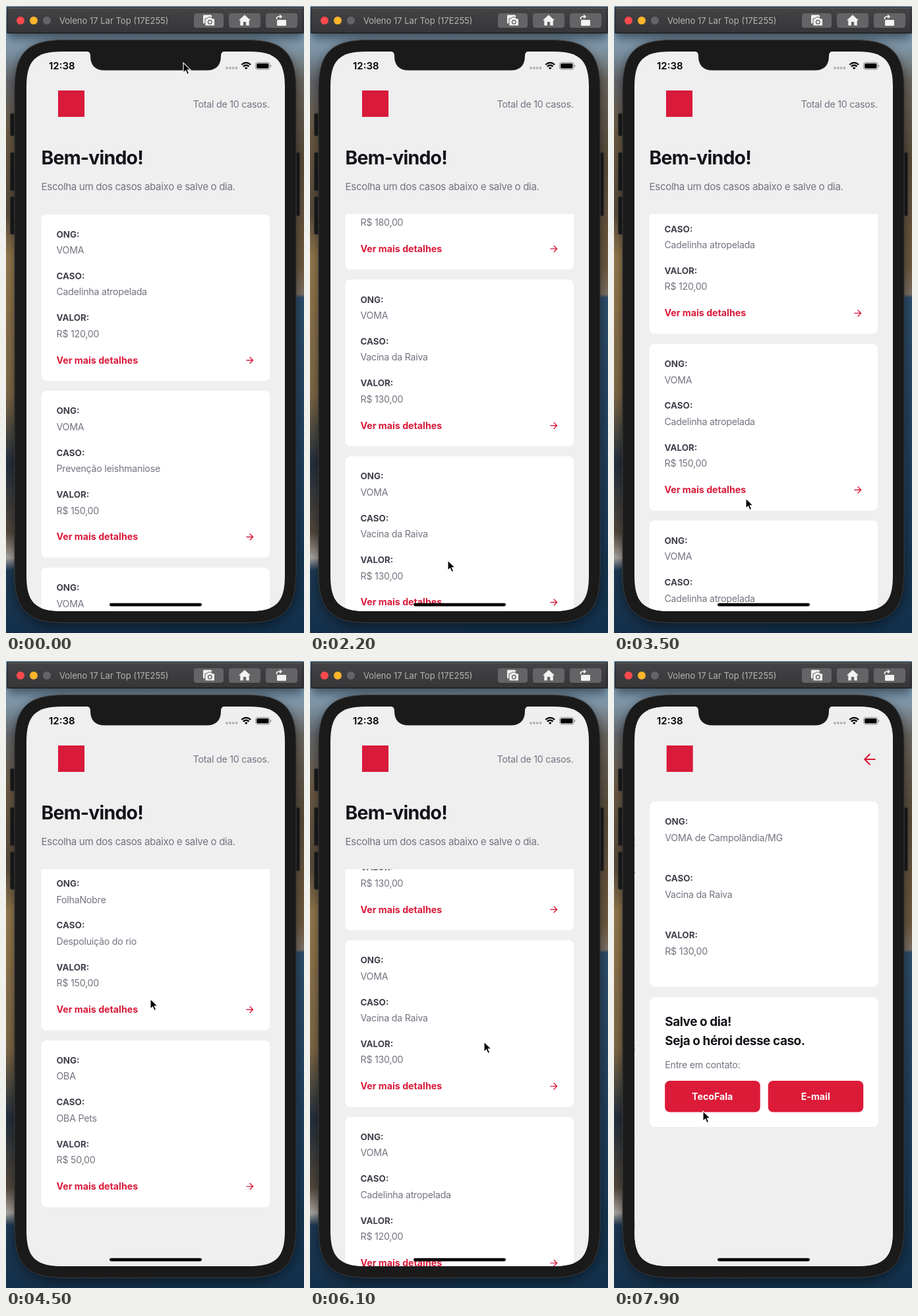
Write an HTML page that moves like this. It is 452x950 px and loops after 8 s.

```html
<!DOCTYPE html>
<html lang="pt-BR">
<head>
<meta charset="utf-8">
<title>Casos</title>
<style>
html, body { margin: 0; width: 100%; height: 100%; overflow: hidden; }
body {
  background:
    linear-gradient(#86a5bd 5%, #63666a 12%, #6b5a44 20%, #57493a 33%, #94794f 40%, #7f6846 62%,
      #23303e 73%, #54483c 84%, #a8a49e 88%, #1e3a55 90%, #142f49) 0 0 / 226px 950px no-repeat,
    linear-gradient(#86a5bd 5%, #6a655f 12%, #574936 25%, #6f5b41 42%, #7d7266 46%,
      #2d4e6c 46.5%, #234462 65%, #12304a) 226px 0 / 226px 950px no-repeat;
}
svg { display: block; width: 452px; height: 950px; }
text { font-family: Inter, "Liberation Sans", sans-serif; -webkit-font-smoothing: antialiased; }
.label { font-size: 13.4px; font-weight: 700; fill: #41414d; }
.value { font-size: 14.2px; fill: #737380; letter-spacing: -.017em; }
.link { font-size: 14.2px; font-weight: 700; fill: #d91a3a; }
.button { font-size: 14.2px; font-weight: 700; fill: #fff; text-anchor: middle; }
.title { font-size: 28.4px; font-weight: 700; fill: #13131a; letter-spacing: -.027em; }
.intro { font-size: 15.1px; fill: #737380; letter-spacing: -.022em; }
.hero { font-size: 18.9px; font-weight: 700; fill: #13131a; letter-spacing: -.022em; }
.clock { font-size: 15px; font-weight: 600; }
.window { font-size: 13px; fill: #b4b4b4; }
.arrow { fill: none; stroke: #d91a3a; stroke-linecap: round; stroke-linejoin: round; }
</style>
</head>
<body>
<svg viewBox="0 0 452 950">
  <defs>
    <clipPath id="screen"><path id="glass"/></clipPath>
    <clipPath id="listArea"><rect x="31" y="315.5" width="392" height="602"/></clipPath>
    <linearGradient id="bar" x2="0" y2="1"><stop stop-color="#444446"/><stop offset="1" stop-color="#363638"/></linearGradient>
    <filter id="soft" x="-10%" y="-50%" width="120%" height="200%"><feGaussianBlur stdDeviation="8"/></filter>
  </defs>

  <!-- phone body -->
  <rect x="2" y="12" width="449" height="38" opacity=".5" filter="url(#soft)"/>
  <rect x="12" y="54" width="429" height="886" rx="62" opacity=".45" filter="url(#soft)"/>
  <g fill="#161616" stroke="#303030">
    <rect x="6.5" y="163" width="9" height="34" rx="2"/>
    <rect x="6.5" y="222" width="9" height="58" rx="2"/>
    <rect x="6.5" y="289" width="9" height="57" rx="2"/>
    <rect x="437" y="222" width="8.5" height="96" rx="2"/>
  </g>
  <path id="body" fill="#1a1a1a" stroke="#3c3c3c"/>

  <g clip-path="url(#screen)">
    <rect x="31" y="69" width="392" height="848" fill="#efeff0"/>
    <g id="home">
      <rect x="79" y="128" width="40" height="40" fill="#d91a3a"/>
      <text class="value" x="399.5" y="153.5" text-anchor="end">Total de 10 casos.</text>
      <text class="title" x="53.5" y="240">Bem-vindo!</text>
      <text class="intro" x="53.5" y="279.3">Escolha um dos casos abaixo e salve o dia.</text>
      <g clip-path="url(#listArea)"><g id="list"></g></g>
    </g>
    <rect id="dim" x="31" y="69" width="392" height="848" opacity="0"/>
    <g id="detail"></g>
  </g>

  <!-- status bar, notch and home indicator -->
  <path d="M122 68.5q6 .5 6 7q0 22 22 22H304q22 0 22-22q0-6.5 6-7z" fill="#1a1a1a"/>
  <text class="clock" x="65" y="96">12:38</text>
  <path d="M335 94h15" stroke="#b4b4b6" stroke-width="3.8" stroke-linecap="round" stroke-dasharray="0 4.8"/>
  <path d="M357.3 89q6.9-6.2 13.8 0M359.8 91.7q4.4-3.8 8.8 0" fill="none" stroke="#000" stroke-width="2.3"/>
  <path d="M361.8 93.6q2.4-1.9 4.8 0l-2.4 2.6z"/>
  <rect x="378.5" y="85.5" width="21.5" height="10.5" rx="3" fill="none" stroke="#8a8a8a"/>
  <rect x="380" y="87" width="18.5" height="7.5" rx="1.7"/>
  <path d="M401.2 89v3.6q1.4-.5 1.4-1.8t-1.4-1.8z" fill="#8a8a8a"/>
  <rect x="157" y="904.7" width="140" height="4.8" rx="2.4"/>

  <!-- window bar -->
  <rect x="2" y="2" width="449" height="39" fill="url(#bar)" stroke="#0b0b0b"/>
  <path d="M3 3.2H450" stroke="#666"/>
  <circle cx="22" cy="22" r="6" fill="#fc4a4d"/>
  <circle cx="42" cy="22" r="6" fill="#fdb42c"/>
  <circle cx="62" cy="22" r="6" fill="#646466"/>
  <text class="window" x="81" y="27">Voleno 17 Lar Top (17E255)</text>
  <g fill="#646466">
    <rect x="285" y="11" width="45" height="22" rx="4"/>
    <rect x="338" y="11" width="48" height="22" rx="4"/>
    <rect x="394" y="11" width="48" height="22" rx="4"/>
  </g>
  <g fill="#f2f2f2">
    <rect x="299" y="13.5" width="13" height="13" rx="1.5"/>
    <path d="M302 19h3l1.5-2h5l1.5 2h3.5v11h-14.5z" stroke="#646466"/>
    <circle cx="309.3" cy="24.3" r="2.8" fill="none" stroke="#646466" stroke-width="1.4"/>
    <path d="M362 13.5l9 8.3h-2.3v7.7h-4.5v-5.5h-4.4v5.5h-4.5v-7.7H353z"/>
    <rect x="411" y="21" width="14" height="9" rx="1.3"/>
    <path d="M410.5 20v-1q0-3 3.2-3h2" fill="none" stroke="#f2f2f2" stroke-width="1.7"/>
    <path d="M415 12.7l4.3 3.3-4.3 3.3z"/>
  </g>

  <path id="cursor" d="M0 0v15.2l3.5-3.3 2.4 5.6 2.7-1.1-2.4-5.5h4.9z" stroke="#fff" stroke-width="1.1"/>
</svg>
<script>
const LOOP = 8000, STEP = 100, WIDTH = 392, PITCH = 267.8, SETTLE = 800, PUSH_AT = 7430;
const get = id => document.getElementById(id);
const text = (cls, x, y, s) => `<text class="${cls}" x="${x}" y="${y}">${s}</text>`;
const box = (x, y, w, h, fill = '#fff') =>
  `<rect x="${x}" y="${y}" width="${w}" height="${h}" rx="7.5" fill="${fill}"/>`;
const fields = (values, top, pitch) => ['ONG:', 'CASO:', 'VALOR:'].map((label, i) =>
  text('label', 76.5, top + i * pitch, label) +
  text('value', 76.5, top + 24.5 + i * pitch, values[i])).join('');

// rectangle with continuous corners, each spanning e along both sides
function squircle(x, y, w, h, e) {
  const k = e * .75;
  return `M${x} ${y + e}c0 ${-k} ${e - k} ${-e} ${e} ${-e}h${w - 2 * e}c${k} 0 ${e} ${e - k} ${e} ${e}` +
    `v${h - 2 * e}c0 ${k} ${k - e} ${e} ${-e} ${e}h${2 * e - w}c${-k} 0 ${-e} ${k - e} ${-e} ${-e}z`;
}
get('glass').setAttribute('d', squircle(31, 69, WIDTH, 848, 54));
get('body').setAttribute('d', squircle(13, 51.5, 427, 883, 76));

const cases = [
  ['VOMA', 'Cadelinha atropelada', 120],
  ['VOMA', 'Prevenção leishmaniose', 150],
  ['VOMA', 'Prevenção leishmaniose', 180],
  ['VOMA', 'Vacina da Raiva', 130],
  ['VOMA', 'Vacina da Raiva', 130],
  ['VOMA', 'Cadelinha atropelada', 120],
  ['VOMA', 'Cadelinha atropelada', 150],
  ['VOMA', 'Cadelinha atropelada', 150],
  ['FolhaNobre', 'Despoluição do rio', 150],
  ['OBA', 'OBA Pets', 50],
];

get('list').innerHTML = cases.map(([org, what, price], i) =>
  `<g transform="translate(0 ${315.5 + i * PITCH})">` + box(53.5, 0, 346.5, 252.5) +
  fields([org, what, `R$ ${price},00`], 35, 63.4) +
  text('link', 76.5, 226.2, 'Ver mais detalhes') +
  '<path class="arrow" stroke-width="1.4" d="M365 221.2h9.6m-4.5-4.5l4.5 4.5-4.5 4.5"/></g>').join('');

get('detail').innerHTML =
  '<rect x="31" y="69" width="392" height="848" fill="#efeff0"/>' +
  '<rect x="79" y="128" width="40" height="40" fill="#d91a3a"/>' +
  '<path class="arrow" stroke-width="2.2" d="M395 149h-15.5m7.7-7.7l-7.7 7.7 7.7 7.7"/>' +
  box(53.5, 213, 346.5, 280.5) +
  fields(['VOMA de Campolândia/MG', 'Vacina da Raiva', 'R$ 130,00'], 248.3, 86) +
  box(53.5, 509.3, 346.5, 196.7) +
  text('hero', 76.5, 553, 'Salve o dia!') +
  text('hero', 76.5, 581.5, 'Seja o héroi desse caso.') +
  text('value', 76.5, 617.3, 'Entre em contato:') +
  box(76.5, 636, 144.5, 47.5, '#dc1b39') + text('button', 148.5, 664.6, 'TecoFala') +
  box(233, 636, 144.5, 47.5, '#dc1b39') + text('button', 305, 664.6, 'E-mail');

// pointer gestures; a drag moves the list, which then coasts to rest
const gestures = [
  { start: 0, x: 269, from: 86, rest: 0 },
  { start: 700, length: 500, x: 245, from: 720, to: 418, rest: 704.4 },
  { start: 2300, length: 400, x: 209, from: 840, to: 540, rest: 1410.3 },
  { start: 3600, length: 400, x: 200, from: 746, to: 512, rest: 2179 },
  { start: 4500, x: 219, from: 512, rest: 2076.6 },
  { start: 5300, length: 300, x: 264, from: 300, to: 577, rest: 917 },
  { start: 6100, x: 264, from: 577, rest: 917 },
  { start: 7000, x: 135, from: 682, rest: 917 },
];

const mix = (a, b, p) => a + (b - a) * p;
const easeOut = p => 1 - (1 - p) ** 3;
const smooth = p => p * p * (3 - 2 * p);

function pose(t) {
  let scroll = 0, x, y;
  gestures.forEach((g, i) => {
    if (t < g.start) return;
    const { start, length = 0, from, to = from, rest } = g;
    const next = gestures[i + 1] || { ...g, start: LOOP };
    const end = start + length;
    x = g.x;
    y = t < end ? mix(from, to, (t - start) / length) : to;
    scroll += from - y;
    if (t < end) return;
    const idle = Math.min(t, next.start) - end;
    scroll = mix(scroll, rest, easeOut(Math.min(1, idle / SETTLE)));
    const glide = smooth(Math.min(1, idle / Math.min(SETTLE, next.start - end)));
    x = mix(x, next.x, glide);
    y = mix(y, next.from, glide);
  });
  return { scroll, x, y };
}

const move = (id, x, y) => get(id).setAttribute('transform', `translate(${x} ${y})`);

function draw(now) {
  const t = Math.floor(now % LOOP / STEP) * STEP;
  const { scroll, x, y } = pose(t);
  move('list', 0, -scroll);
  move('cursor', x, y);
  // critically damped spring for the page push
  const w = Math.max(0, t - PUSH_AT) * .01826;
  const left = (1 + w) * Math.exp(-w);
  move('detail', WIDTH * left, 0);
  move('home', -.3 * WIDTH * (1 - left), 0);
  get('dim').setAttribute('opacity', .07 * (1 - left));
  requestAnimationFrame(draw);
}
draw(performance.now());
</script>
</body>
</html>
```
